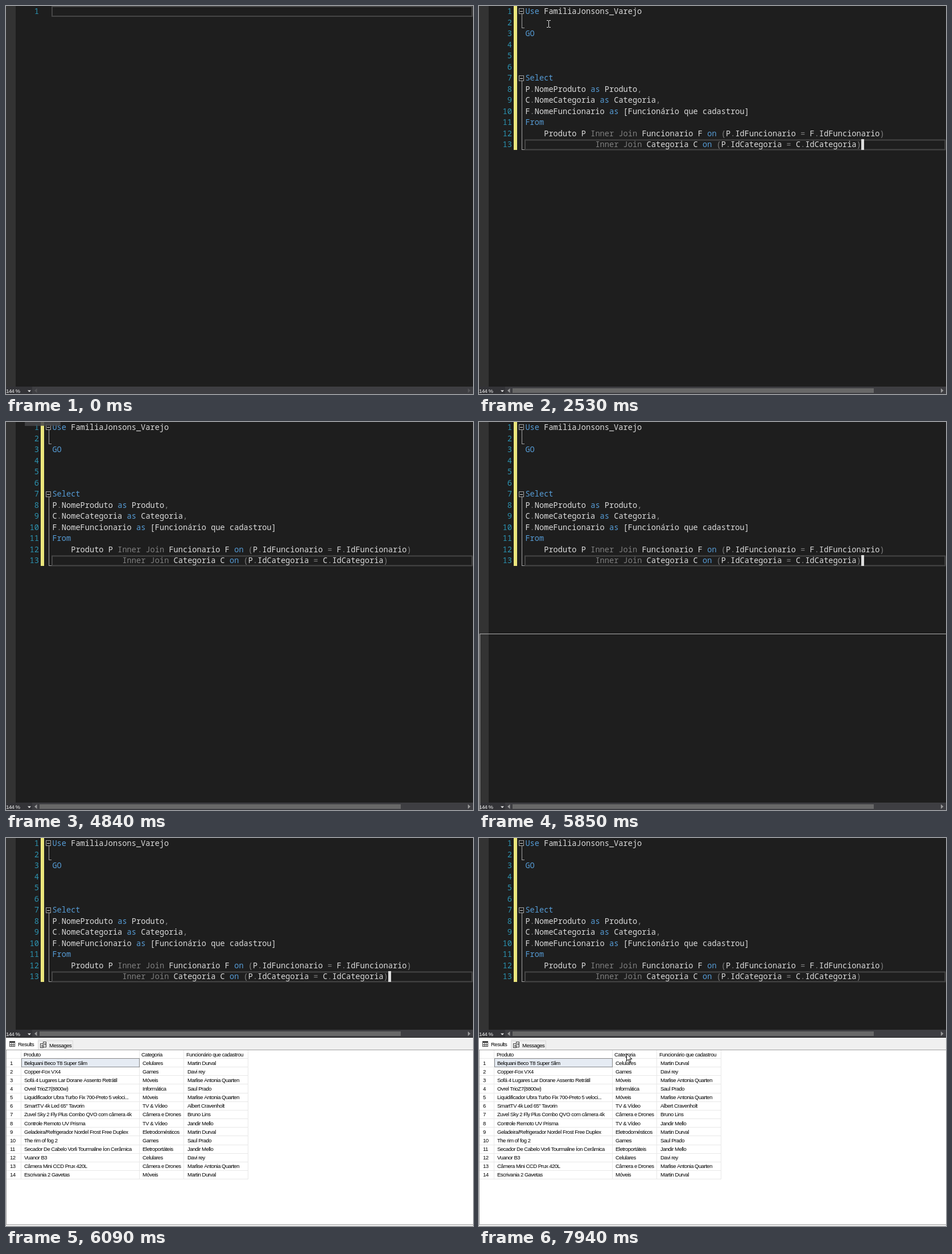
Recreate the animation shown at these times as an HTML page with a canvas. Size 821 px wide and 682 px high, loop 8 s.

```html
<!DOCTYPE html>
<html lang="pt">
<head>
<meta charset="utf-8">
<style>
html, body { margin: 0; width: 100%; height: 100%; overflow: hidden; background: #1e1e1e; }
canvas { display: block; }
</style>
</head>
<body>
<canvas id="stage" width="821" height="682"></canvas>
<script>
const g = document.getElementById('stage').getContext('2d');
const LOOP = 8000, CHAR = 8.2, LINE = 19.53, LEFT = 81.4;
const PASTE = 2220, FOLD = 2530, OUTLINE = 5780, PANE = 5940, GRID = 6020;
const MONO = '13.67px "Noto Sans Mono", monospace';
const UI = '9.5px "Liberation Sans", Arial, sans-serif';
const BLUE = '#569cd6', GRAY = '#808080', TEXT = '#dcdcdc';

const code = [
  'Use FamiliaJonsons_Varejo', '', 'GO', '', '', '', 'Select',
  'P.NomeProduto as Produto,',
  'C.NomeCategoria as Categoria,',
  'F.NomeFuncionario as [Funcionário que cadastrou]',
  'From',
  '    Produto P Inner Join Funcionario F on (P.IdFuncionario = F.IdFuncionario)',
  '               Inner Join Categoria C on (P.IdCategoria = C.IdCategoria)'
];

const MARTIN = 'Martin Durval', DAVI = 'Davi rey', MARLISE = 'Marlise Antonia Quarten',
  SAUL = 'Saul Prado', JANDIR = 'Jandir Mello';
const rows = [
  ['Belquani Beco T8 Super Slim', 'Celulares', MARTIN],
  ['Copper-Fox VX4', 'Games', DAVI],
  ['Sofá 4 Lugares Lar Dorane Assento Retrátil', 'Móveis', MARLISE],
  ['Ovrel TrioZ7(8800w)', 'Informática', SAUL],
  ['Liquidificador Ubra Turbo Fix 700-Preto 5 veloci...', 'Móveis', MARLISE],
  ['SmartTV 4k Led 65" Tavorin', 'TV & Vídeo', 'Albert Cravenholt'],
  ['Zuvel Sky 2 Fly Plus Combo QVO com câmera 4k', 'Câmera e Drones', 'Bruno Lins'],
  ['Controle Remoto UV Prisma', 'TV & Vídeo', JANDIR],
  ['Geladeira/Refrigerador Nordel Frost Free Duplex', 'Eletrodomésticos', MARTIN],
  ['The rim of fog 2', 'Games', SAUL],
  ['Secador De Cabelo Vorli Tourmaline Íon Cerâmica', 'Eletroportáteis', JANDIR],
  ['Vuanor B3', 'Celulares', DAVI],
  ['Câmera Mini CCD Prux 420L', 'Câmera e Drones', MARLISE],
  ['Escrivania 2 Gavetas', 'Móveis', MARTIN]
];

// Pointer paths: [ms, x, y]
const paths = [
  [[130, 666, 629], [300, 520, 450], [520, 300, 210], [740, 165, 84], [900, 126, 48],
   [1210, 122, 30], [2530, 122, 30], [2900, 290, 254], [3300, 230, 100], [3680, 168, 36],
   [3990, 82, -10]],
  [[6150, 84, -10], [6550, 95, 456], [6790, 97, 391], [7100, 26, 386], [7400, 58, 376],
   [7480, 66, 376], [7900, 259, 379], [LOOP, 259, 379]]
];
// Caret toggles, starting from off
const blinks = [1210, 1670, 2130, 2655, 3200, 3745, 4290, 4840, 5380, 6630, 7170, 7710];

function box(x, y, w, h, color) {
  g.fillStyle = color;
  g.fillRect(x, y, w, h);
}

function poly(points, color) {
  g.fillStyle = color;
  g.beginPath();
  points.forEach(([x, y]) => g.lineTo(x, y));
  g.closePath();
  g.fill();
}

function label(s, x, y, color) {
  g.font = UI;
  g.letterSpacing = '-0.5px';
  g.fillStyle = color;
  g.fillText(s, x, y);
  g.letterSpacing = '0px';
}

function frame(x, y, w, h, color, width) {
  g.strokeStyle = color;
  g.lineWidth = width;
  g.strokeRect(x, y, w, h);
}

function codeLine(s, y) {
  for (const m of s.matchAll(/[\wáà-ú\[\]]+|[.,()=]/g)) {
    g.fillStyle = /^(Use|GO|Select|as|From|on)$/.test(m[0]) ? BLUE
      : /^(Inner|Join|[.,()=])$/.test(m[0]) ? GRAY : TEXT;
    g.fillText(m[0], LEFT + m.index * CHAR, y);
  }
}

function foldMark(y, end) {
  box(75, y + 5, 1, end - y - 5, '#a5a5a5');
  box(75, end, 5, 1, '#a5a5a5');
  frame(70.5, y - 4.5, 8, 9, '#a5a5a5', 1);
  box(72, y, 5, 1, '#dcdcdc');
}

function editor(t) {
  const pasted = t >= PASTE, top = pasted ? 234.5 : 0;
  box(0, 0, 821, 682, '#1e1e1e');
  box(0, 0, 17, 682, '#333333');
  frame(81, top + 1, 738.5, 17, '#464646', 2);
  if (pasted) box(61, 0, 6, 253, '#ebe67c');
  g.font = MONO;
  code.slice(0, pasted ? 13 : 1).forEach((s, i) => {
    const y = Math.round(14 + i * LINE), n = String(i + 1);
    g.fillStyle = '#2b91af';
    g.fillText(n, 58 - n.length * CHAR, y);
    if (pasted) codeLine(s, y);
  });
  if (t >= FOLD) {
    foldMark(9, 38);
    foldMark(127, 252);
  }
  const on = blinks.filter(b => b <= t).length % 2;
  if (on) box(pasted ? 672 : 82, Math.floor(top), 5, 19, TEXT);
}

function bottomBar(y, active) {
  const arrow = active ? '#999999' : '#555558';
  box(0, y, 821, 13, '#3e3e42');
  box(0, y, 46, 13, '#333337');
  label('144 %', 0, y + 10.5, '#f1f1f1');
  poly([[38, y + 6.5], [44, y + 6.5], [41, y + 9.5]], '#f1f1f1');
  poly([[54.5, y + 3], [54.5, y + 11], [50, y + 7]], arrow);
  poly([[812, y + 3], [812, y + 11], [816.5, y + 7]], arrow);
  if (active) box(59, y + 3, 635, 8, '#686868');
}

function tabIcons() {
  frame(6.5, 357.5, 9, 9, '#424242', 1);
  box(6, 357, 10, 3, '#424242');
  box(9, 358, 1, 9, '#424242');
  box(12, 358, 1, 9, '#424242');
  box(6, 363, 10, 1, '#424242');
  frame(60.5, 361.5, 5, 7, '#424242', 1);
  box(62, 364, 3, 1, '#424242');
  box(62, 366, 3, 1, '#424242');
  frame(65.5, 358.5, 5, 9, '#424242', 1);
  box(67, 361, 3, 1, '#424242');
  box(67, 363, 3, 1, '#424242');
}

function grid() {
  const rowY = i => 388 + i * 15.15, line = '#e8e8e8';
  box(0, 351, 821, 331, '#f0f0f0');
  box(0, 353, 56, 20, '#ffffff');
  box(56, 356, 1, 16, '#d9d9d9');
  box(117, 356, 1, 16, '#d9d9d9');
  box(57, 356, 60, 1, '#d9d9d9');
  tabIcons();
  label('Results', 21, 366, '#000');
  label('Messages', 76, 367.5, '#000');
  box(0, 372, 821, 308, '#ffffff');
  box(0, 372, 821, 1, '#a0a0a0');
  box(0, 372, 1, 308, '#a0a0a0');
  box(0, 679, 821, 1, '#a0a0a0');
  [26, 234, 312, 425].forEach(x => box(x, 373, 1, 227, line));
  for (let i = 0; i <= rows.length; i++) box(1, Math.round(rowY(i)) - 1, 425, 1, line);
  box(27, 388, 207, 15, '#e5ebf3');
  g.setLineDash([1, 1]);
  frame(27.5, 387.5, 207, 15, '#222', 1);
  g.setLineDash([]);
  label('Produto', 31, 383.5, '#000');
  label('Categoria', 238, 383.5, '#000');
  label('Funcionário que cadastrou', 317, 383.5, '#000');
  rows.forEach(([name, kind, who], i) => {
    const y = Math.round(rowY(i) + 10.5);
    label(i + 1, 7, y, '#000');
    label(name, 32, y, '#000');
    label(kind, 240, y, '#000');
    label(who, 319, y, '#000');
  });
}

function emptyPane() {
  box(0, 350, 821, 3, '#2d2d30');
  box(0, 353, 821, 19, '#1e1e1e');
  box(0, 353, 157, 19, '#ffffff');
  box(0, 372, 821, 310, '#ffffff');
  box(0, 433, 1, 247, '#333337');
  box(0, 680, 821, 2, '#3e3e42');
}

function pointer(t) {
  const path = paths.find(p => t >= p[0][0] && t < p[p.length - 1][0]);
  if (!path) return;
  const i = path.findIndex(p => p[0] > t), [t0, x0, y0] = path[i - 1], [t1, x1, y1] = path[i];
  const k = (t - t0) / (t1 - t0);
  const x = Math.round(x0 + (x1 - x0) * k), y = Math.round(y0 + (y1 - y0) * k);
  if (t >= GRID && y > 337) {
    const shape = [[0, 0], [0, 13], [3, 10], [5.3, 15.5], [7.5, 14.5], [5.2, 9.5], [9.3, 9.5]]
      .map(([dx, dy]) => [x + dx + 0.5, y + dy]);
    poly(shape, '#fff');
    g.strokeStyle = '#000';
    g.lineWidth = 1;
    g.stroke();
  } else {
    box(x, y - 5, 1, 11, '#e6e6e6');
    [-6, 6].forEach(d => {
      box(x - 3, y + d, 3, 1, '#e6e6e6');
      box(x + 1, y + d, 3, 1, '#e6e6e6');
    });
  }
}

function draw(t) {
  editor(t);
  bottomBar(t < PANE ? 669 : 337, t >= PASTE);
  if (t >= OUTLINE && t < PANE) frame(1.5, 372.5, 830, 320, '#b0b0b0', 1);
  if (t >= GRID) grid();
  else if (t >= PANE) emptyPane();
  // Lower edge of the toolbar tooltip
  if (t >= 4770 && t < 5230) {
    g.globalAlpha = Math.min(1, (t - 4700) / 220);
    box(33, 0, 63, 7, '#4d4d50');
    box(34, 0, 61, 6, '#424245');
    g.globalAlpha = 1;
  }
  pointer(t);
}

function tick(now) {
  draw(now % LOOP);
  requestAnimationFrame(tick);
}
draw(0);
requestAnimationFrame(tick);
</script>
</body>
</html>
```
